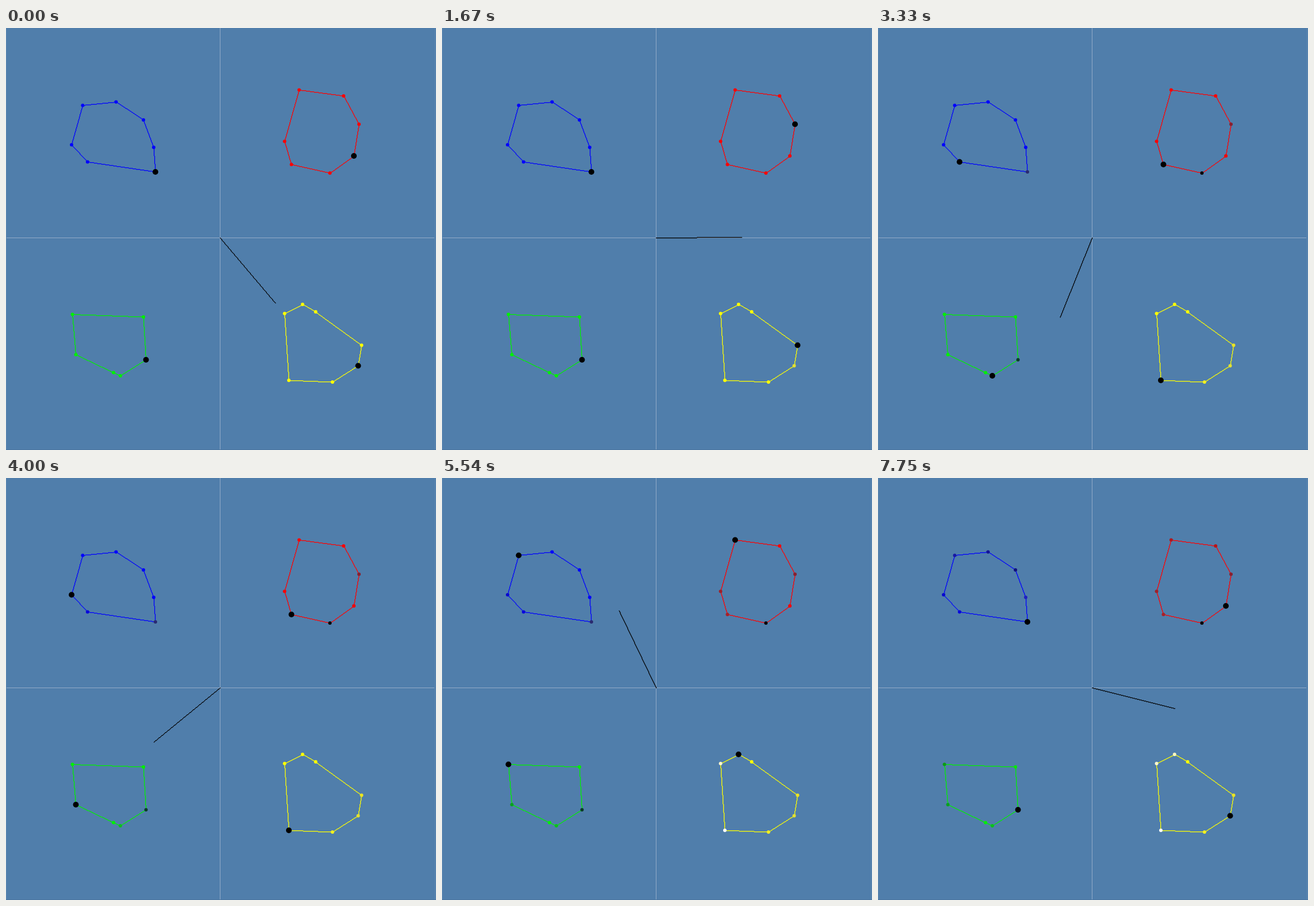
Recreate the animation shown at these times as an HTML page with a canvas. Size 754 by 739 pixels, loop 8000 ms.

```html
<!DOCTYPE html>
<html lang="en">
<head>
<meta charset="utf-8">
<title>Support points</title>
<style>
  html, body { margin: 0; width: 100%; height: 100%; overflow: hidden; background: #507eab; }
  canvas { display: block; }
</style>
</head>
<body>
<canvas id="stage" width="754" height="739"></canvas>
<script>
const ctx = document.getElementById('stage').getContext('2d');
const LOOP = 8000, REACH = 149.7;
const CENTER = [375.5, 367.5];

// used: dot colours once a vertex has been the support point
const shapes = [
  { color: '#0000ff',
    pts: [[262, 252], [143, 234.5], [115, 204.5], [134.5, 135.5], [193, 129.5], [241, 161], [259, 209]],
    used: ['#2a2a70', '#0808dc', '#0808d0', '#1818a4', '#141494', '#101080', '#2020c0'] },
  { color: '#ff0000',
    pts: [[610, 224], [568, 254], [500.5, 239], [488.5, 198.5], [514, 108.5], [592, 119], [619, 168.5]],
    used: ['#f80000', '#080404', '#a82028', '#a02028', '#b01820', '#b81418', '#882030'] },
  { color: '#00f000',
    pts: [[245.5, 581], [200.5, 609], [188.5, 603.5], [122.5, 572], [116.5, 501.5], [241, 506]],
    used: ['#0a3c28', '#0cc01c', '#00f000', '#0aa020', '#0a9c14', '#08e808'] },
  { color: '#ffff00',
    pts: [[617.5, 591.5], [572.5, 620], [496, 617], [488.5, 500], [520, 484], [543, 497], [623.5, 555.5]],
    used: ['#e4e030', '#f2f020', '#ffffff', '#fff8d0', '#fff8c0', '#ffff00', '#ece420'] }
];

// hand angle in degrees at key times
const keys = [
  [0, 49.8], [70, 48.3], [340, 21], [610, -2], [1670, -0.4], [2100, 28], [2440, 52], [2510, 53],
  [2780, 54.6], [3160, 97], [3530, 134.8], [3600, 137.3], [3800, 139.6], [4000, 140.7],
  [4390, 176], [4780, 212.5], [5540, 244.3], [5610, 251.8], [6000, 288], [6380, 315.5],
  [6580, 316.9], [7340, 352], [7750, 374]
];

// bursts of movement: start, end, number of steps
const runs = [[70, 610, 9], [1670, 2510, 13], [2780, 3800, 15], [4000, 6380, 35], [6580, 7750, 17]];

const slope = i => (keys[i + 1][1] - keys[i][1]) / (keys[i + 1][0] - keys[i][0]);

function tangent(i) {
  if (i === 0 || i === keys.length - 1) return 0;
  const a = slope(i - 1), b = slope(i);
  return a * b <= 0 ? 0 : 2 * a * b / (a + b);
}

function angleAt(t) {
  let i = 0;
  while (i < keys.length - 2 && t >= keys[i + 1][0]) i++;
  const [t0, a0] = keys[i], [t1, a1] = keys[i + 1];
  const d = t1 - t0, u = Math.min(1, (t - t0) / d), v = 1 - u;
  return a0 * v * v * (1 + 2 * u) + a1 * u * u * (3 - 2 * u) +
    d * u * v * (v * tangent(i) - u * tangent(i + 1));
}

function support(pts, dir) {
  let best = 0, max = -Infinity;
  pts.forEach(([x, y], i) => {
    const d = x * dir[0] + y * dir[1];
    if (d > max) { max = d; best = i; }
  });
  return best;
}

function makeStep(time) {
  const a = angleAt(time) * Math.PI / 180;
  const dir = [Math.cos(a), Math.sin(a)];
  return { time, dir, picks: shapes.map(s => support(s.pts, dir)) };
}

const steps = [makeStep(0)];
for (const [from, to, n] of runs)
  for (let i = 0; i < n; i++) steps.push(makeStep(from + (to - from) * i / (n - 1)));

// time at which each vertex is first released
shapes.forEach((s, k) => {
  s.freed = s.pts.map(() => Infinity);
  for (let i = 1; i < steps.length; i++) {
    const before = steps[i - 1].picks[k];
    if (before !== steps[i].picks[k])
      s.freed[before] = Math.min(s.freed[before], steps[i].time);
  }
});

// hard-edged line
function line([x0, y0], [x1, y1], color) {
  const dx = x1 - x0, dy = y1 - y0;
  const n = Math.max(1, Math.round(Math.max(Math.abs(dx), Math.abs(dy))));
  ctx.fillStyle = color;
  for (let i = 0; i <= n; i++)
    ctx.fillRect(Math.floor(x0 + dx * i / n), Math.floor(y0 + dy * i / n), 1.25, 1.25);
}

function dot([x, y], r, color) {
  ctx.fillStyle = color;
  ctx.beginPath();
  ctx.arc(x, y, r, 0, 2 * Math.PI);
  ctx.fill();
}

function rect(x, y, w, h, color) {
  ctx.fillStyle = color;
  ctx.fillRect(x, y, w, h);
}

function draw(t) {
  let step = steps[0];
  for (const s of steps) if (s.time <= t + 0.01) step = s;

  rect(0, 0, 754, 739, '#507eab');
  rect(0, 0, 1, 739, '#5c87b1');
  rect(752, 0, 1, 739, '#5c87b1');
  rect(0, 738, 754, 1, '#48739f');
  rect(375, 0, 1, 738, '#93abc8');
  rect(1, 367, 750, 1, '#93abc8');

  shapes.forEach((s, k) => {
    s.pts.forEach((p, i) => line(p, s.pts[(i + 1) % s.pts.length], s.color));
    s.pts.forEach((p, i) => dot(p, 3, t + 0.01 >= s.freed[i] ? s.used[i] : s.color));
    dot(s.pts[step.picks[k]], 5, '#000');
  });

  line(CENTER, CENTER.map((c, i) => c + REACH * step.dir[i]), '#000');
}

const start = performance.now();
function tick() {
  draw((performance.now() - start) % LOOP);
  requestAnimationFrame(tick);
}
tick();
</script>
</body>
</html>
```
